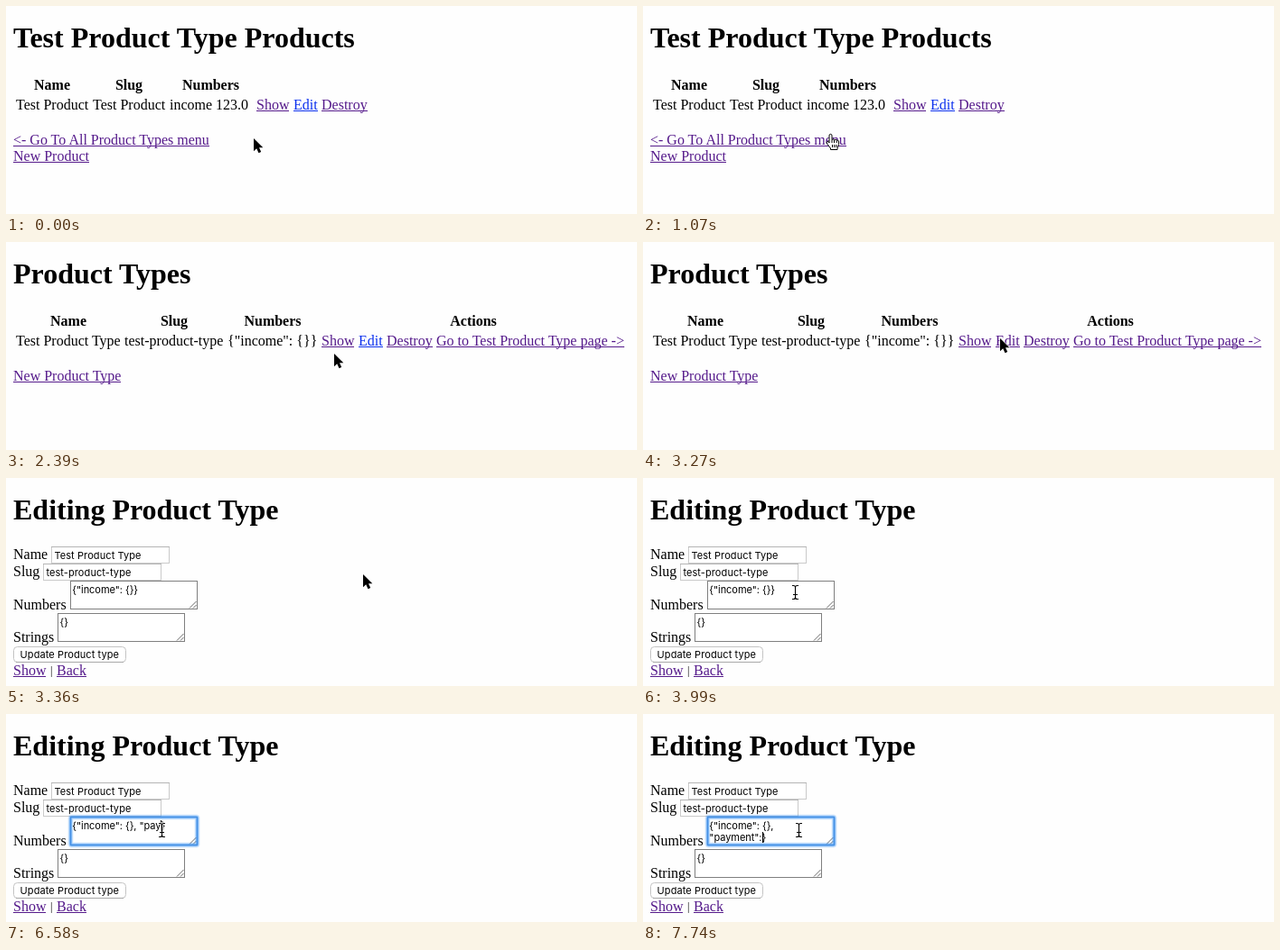
Recreate the animation shown at these times as an HTML page. Size 698 by 231 pixels, loop 8000 ms.

```html
<!DOCTYPE html>
<html lang="en">
<head>
<meta charset="utf-8">
<title>Product types</title>
<style>
  html, body { margin: 0; width: 100%; height: 100%; overflow: hidden; background: #fefefe; }
  svg { display: block; width: 698px; height: 231px; }
  text { font: 16px "Liberation Serif", Times, serif; white-space: pre; fill: currentColor; }
  .h1 { font-size: 32px; font-weight: bold; }
  .th { font-weight: bold; text-anchor: middle; }
  .bar { font-size: 12px; }
  .link { color: #551a8b; }
  .new { color: #0a2fee; }
  .ui { font: 11px Inter, "Liberation Sans", sans-serif; letter-spacing: 0.09px; }
  .code { letter-spacing: -0.04px; }
</style>
</head>
<body>
<svg id="stage" viewBox="0 0 698 231"></svg>
<script>
const LOOP = 8000;
const stage = document.getElementById('stage');

function add(parent, tag, attrs = {}, content = '') {
  const el = document.createElementNS('http://www.w3.org/2000/svg', tag);
  for (const key in attrs) el.setAttribute(key, attrs[key]);
  el.textContent = content;
  return parent.appendChild(el);
}
const label = (g, x, y, content, cls = '') => add(g, 'text', { x, y, class: cls }, content);
const show = (el, on) => el.setAttribute('visibility', on ? 'visible' : 'hidden');

function link(g, x, y, content, cls = '') {
  const a = add(g, 'g', { class: 'link ' + cls });
  const width = Math.round(label(a, x, y, content).getComputedTextLength());
  add(a, 'path', { d: `M${x} ${y + 1.5}h${width}`, stroke: 'currentColor' });
  return a;
}
function page(title) {
  const g = add(stage, 'g');
  label(g, 8, 46, title, 'h1');
  return g;
}
function heads(g, list) {
  for (const [x, name] of list) label(g, x, 93, name, 'th');
}

// Product list
const products = page('Test Product Type Products');
heads(products, [[51, 'Name'], [136, 'Slug'], [226.5, 'Numbers']]);
label(products, 11, 115, 'Test Product');
label(products, 96, 115, 'Test Product');
label(products, 181, 115, 'income 123.0');
link(products, 277, 115, 'Show');
link(products, 318, 115, 'Edit', 'new');
link(products, 349, 115, 'Destroy');
link(products, 8, 154, '<- Go To All Product Types menu');
link(products, 8, 172, 'New Product');

// Type list
const types = page('Product Types');
heads(types, [[69, 'Name'], [186, 'Slug'], [295, 'Numbers'], [517, 'Actions']]);
label(types, 11, 115, 'Test Product Type');
label(types, 131, 115, 'test-product-type');
label(types, 245, 115, '{"income": {}}');
link(types, 349, 115, 'Show');
const edit = link(types, 390, 115, 'Edit');
link(types, 421, 115, 'Destroy');
link(types, 476, 115, 'Go to Test Product Type page ->');
link(types, 8, 154, 'New Product Type');

// Edit form
const form = page('Editing Product Type');
function box(g, x, y, w, h, stroke, more = {}) {
  return add(g, 'rect', { x: x + .5, y: y + .5, width: w - 1, height: h - 1, fill: '#fff', stroke, ...more });
}
function input(x, y, value) {
  box(form, x, y, 131, 19, '#cacaca');
  add(form, 'path', { d: `M${x} ${y + .5}h131`, stroke: '#b4b4b4' });
  label(form, x + 3.4, y + 14, value, 'ui');
}
function area(x, y) {
  box(form, x, y, 141, 32, '#7f7f7f');
  add(form, 'path', { d: `M${x + 132} ${y + 30.5}l7.5 -7.5m-3.5 7.5l3.5 -3.5`, stroke: '#555', 'stroke-width': .9 });
}
label(form, 8, 90, 'Name');
input(50, 76, 'Test Product Type');
label(form, 8, 109, 'Slug');
input(41, 95, 'test-product-type');
label(form, 8, 146, 'Numbers');
area(71, 114);
const ring = add(form, 'g');
for (const [width, opacity] of [[6, .15], [4, .4], [2, .75]]) {
  box(ring, 71, 114, 141, 32, '#3f93f0', { rx: 1, fill: 'none', 'stroke-width': width, 'stroke-opacity': opacity });
}
const lines = [128, 141].map(y => label(form, 73.3, y, '', 'ui code'));
const caret = add(form, 'path', { stroke: '#000' });
label(form, 8, 182, 'Strings');
area(57, 150);
label(form, 59.5, 164, '{}', 'ui code');
box(form, 8, 187, 125, 18, '#c4c4c4', { rx: 4 });
add(form, 'path', { d: 'M11 204.5h119', stroke: '#a8a8a8' });
label(form, 15.6, 200, 'Update Product type', 'ui');
link(form, 8, 219, 'Show');
label(form, 49, 218, '|', 'bar');
link(form, 56, 219, 'Back');

// Pointers, each drawn around its hot spot
const pointers = {
  arrow: add(stage, 'g'), hand: add(stage, 'g'), beam: add(stage, 'g')
};
add(pointers.arrow, 'path', {
  d: 'M0 0V14.2L3.2 11.2L5.5 16.2L8.2 15L6 10.2H10.3Z',
  fill: '#000', stroke: '#fff', 'stroke-width': 1.2, 'paint-order': 'stroke'
});
add(pointers.hand, 'path', {
  d: 'M-2 9V1Q-2 -.7 -.5 -.7T1 1V5.5Q2 4.2 3.5 5.6Q5 4.6 6.2 6Q8.6 5.6 8.6 8V10.5L7 15V16.5H-.5V15L-4 10.5Q-5.6 8.4 -4.2 7.6T-2 9ZM1 5.5V9M3.5 6V9M6.2 6.5V9M1.5 11v3M3.7 11v3M5.8 11v3',
  fill: '#fff', stroke: '#000', 'stroke-linejoin': 'round'
});
const beam = 'M-3 -7.5H-1.5Q.5 -7.5 .5 -5.5Q.5 -7.5 2.5 -7.5H4M.5 -5.5V5.5M-2 2.5H3M-3 7.5H-1.5Q.5 7.5 .5 5.5Q.5 7.5 2.5 7.5H4';
add(pointers.beam, 'path', { d: beam, fill: 'none', stroke: '#fff', 'stroke-width': 2.4 });
add(pointers.beam, 'path', { d: beam, fill: 'none', stroke: '#000', 'stroke-width': 1.1 });

// Pointer path: time, x, y
const route = [
  [180, 274, 147], [540, 250, 136], [800, 222, 138], [1070, 208, 143],
  [1690, 208, 143], [2030, 275, 132], [2390, 363, 124], [2560, 376, 119],
  [3010, 395, 107], [3360, 395, 107], [3720, 245, 119], [3990, 168, 127],
  [4080, 170, 128], [4170, 172, 129], [LOOP, 172, 129]
];
// Moments at which the screen is redrawn while the pointer travels
const spans = [[270, 1070, 10], [1690, 2480, 10], [2560, 3010, 6], [3190, 3990, 10], [4080, 4170, 2]];
// Time of each key press
const typed = ', "payment":';
const keys = [5340, 5520, 5880, 6320, 6500, 6580, 6760, 6850, 6940, 7020, 7290, 7740];

function snap(t) {
  let last = 0;
  for (const [from, to, n] of spans) {
    for (let i = 0; i < n; i++) {
      const at = Math.round((from + (to - from) * i / (n - 1)) / 10) * 10;
      if (at <= t) last = at;
    }
  }
  return last;
}
function pointerAt(t) {
  const i = route.findIndex(p => p[0] > t);
  if (i < 1) return route[0].slice(1);
  const [t0, x0, y0] = route[i - 1], [t1, x1, y1] = route[i];
  const k = (t - t0) / (t1 - t0);
  return [Math.round(x0 + (x1 - x0) * k), Math.round(y0 + (y1 - y0) * k)];
}
function pointerKind(t, x, y) {
  if (t < 1690) return x < 227 && y > 138 ? 'hand' : 'arrow';
  if (t < 3190) return x > 388 && y < 118 ? 'hand' : 'arrow';
  return x < 212 ? 'beam' : 'arrow';
}
function drawField(t) {
  const focus = t >= 4170;
  const n = keys.filter(k => k <= t).length;
  const wrapped = n === typed.length;
  const first = '{"income": {}' + typed.slice(0, wrapped ? 1 : n);
  const second = wrapped ? typed.slice(2) : '';
  lines[0].textContent = first + (wrapped ? '' : '}');
  lines[1].textContent = wrapped ? second + '}' : '';
  const line = lines[wrapped ? 1 : 0];
  const count = (wrapped ? second : first).length + (t < 4620 ? 1 : 0);
  const x = Math.round(73.3 + line.getSubStringLength(0, count)) + .5;
  caret.setAttribute('d', `M${x} ${wrapped ? 131 : 118}v12`);
  show(ring, focus);
  show(caret, focus && (t < 5250 || t >= 5340));
}
function draw(now) {
  const t = now % LOOP;
  show(products, t < 1690);
  show(types, t >= 1690 && t < 3360);
  show(form, t >= 3360);
  edit.classList.toggle('new', t < 3190);
  if (t >= 3360) drawField(t);
  else for (const el of [ring, caret]) show(el, false);
  const [x, y] = pointerAt(snap(t));
  const kind = pointerKind(t, x, y);
  for (const name in pointers) {
    show(pointers[name], name === kind);
    pointers[name].setAttribute('transform', `translate(${x} ${y})`);
  }
}
const start = performance.now();
function tick() {
  draw(performance.now() - start);
  requestAnimationFrame(tick);
}
tick();
</script>
</body>
</html>
```
